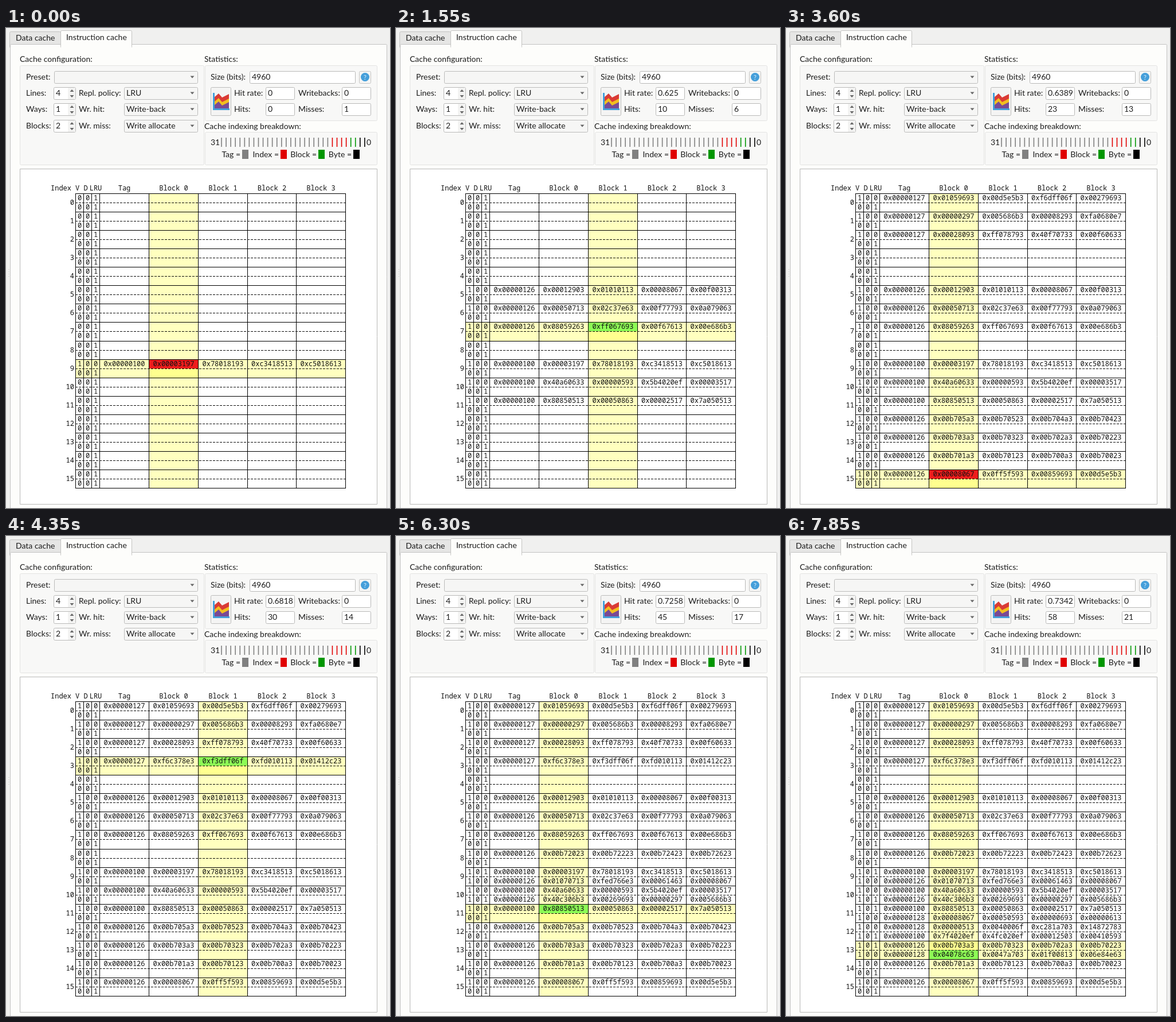
These frames come from a looping animation (670 by 836 pixels, 7.95 s). An HTML page with a canvas:

```html
<!DOCTYPE html>
<html lang="en">
<head>
<meta charset="utf-8">
<title>Instruction cache</title>
<style>
  html, body { margin: 0; width: 100%; height: 100%; overflow: hidden; background: #f0f0ef; }
  canvas { display: block; width: 670px; height: 836px; }
</style>
</head>
<body>
<canvas id="stage" width="670" height="836"></canvas>
<script>
const ctx = document.getElementById('stage').getContext('2d');
const UI = '14px Lato, sans-serif';
const MONO = '12px "Noto Sans Mono", monospace';
const LOOP = 7950;
const PACE = 100.6; // mean ms per fetch

const range = (n, fn) => Array.from({ length: n }, (_, i) => fn(i));
const hex = n => '0x' + n.toString(16).padStart(8, '0');

// Program memory by address
const memory = new Map();
function load(addr, words) {
  words.forEach((word, i) => memory.set(addr + 4 * i, word));
}
const code = str => str.trim().split(/\s+/).map(w => '0x' + w);
const storeByte = n => hex(0x00b70023 | n << 7);
const storeWord = n => hex(0x00b72023 | n << 7);

load(0x10090, code(`
  00003197 78018193 c3418513 c5018613 40a60633 00000593 5b4020ef 00003517
  80850513 00050863 00002517 7a050513 7f4020ef 4fc020ef 00012503 00410593`));
load(0x12650, code(`
  00012903 01010113 00008067 00f00313 00050713 02c37e63 00f77793 0a079063
  08059263 ff067693 00f67613 00e686b3`));
load(0x12680, range(4, i => storeWord(4 * i)));
load(0x12690, code(`
  01070713 fed766e3 00061463 00008067 40c306b3 00269693 00000297 005686b3`));
load(0x126c0, range(12, i => storeByte(11 - i)));
load(0x126f0, code(`
  00008067 0ff5f593 00859693 00d5e5b3 01059693 00d5e5b3 f6dff06f 00279693
  00000297 005686b3 00008293 fa0680e7 00028093 ff078793 40f70733 00f60633
  f6c378e3 f3dff06f fd010113 01412c23`));
load(0x128b0, code(`
  00008067 00050593 00000693 00000613 00000513 0040006f c281a703 14872783
  04078c63 0047a703 01f00813 06e84e63`));

// Straight runs of fetches between jumps; the last one refetches after a stall
const trace = [
  [0x10090, 0x100b0], [0x1265c, 0x12674], [0x1270c, 0x12724], [0x126c0, 0x126f8],
  [0x12720, 0x1273c], [0x12670, 0x126a4], [0x100ac, 0x100c8], [0x128b4, 0x128cc],
  [0x128c8, 0x128d0], [0x128d0, 0x128d0]
].flatMap(([from, to]) => range((to - from) / 4 + 1, i => from + 4 * i));

// Spans of activity: each one catches up with the mean pace, evenly on a 50 ms grid
const spans = [
  [250, 450], [650, 850], [1100, 1300], [1450, 1550], [1700, 2450], [2600, 2650],
  [2800, 2800], [2950, 3450], [3600, 3650], [3800, 4050], [4200, 4350], [4500, 4600],
  [4750, 5250], [5400, 5500], [5700, 5900], [6050, 6600], [6750, 7250], [7400, 7850]
];
const times = [0];
for (const [from, to] of spans) {
  const n = Math.floor(to / PACE) + 1 - times.length;
  const step = n > 1 ? (to - from) / (n - 1) : 0;
  times.push(...range(n, i => 50 * Math.round((from + step * i) / 50)));
}

// Two-way LRU cache after the first n fetches
function simulate(n) {
  const sets = range(16, () => range(2, () => ({ valid: 0, lru: 1, tag: -1, words: [] })));
  const s = { sets, hits: 0, misses: 0 };
  for (const addr of trace.slice(0, n)) {
    const tag = addr >> 8;
    const base = addr & ~15;
    s.index = addr >> 4 & 15;
    s.block = addr >> 2 & 3;
    const ways = sets[s.index];
    s.way = ways.findIndex(w => w.tag === tag);
    s.hit = s.way >= 0;
    if (s.hit) {
      s.hits++;
    } else {
      s.misses++;
      s.way = ways.findIndex(w => w.lru);
      const words = range(4, i => memory.get(base + 4 * i));
      Object.assign(ways[s.way], { valid: 1, tag, words });
    }
    ways.forEach((w, i) => { w.lru = i === s.way ? 0 : 1; });
  }
  return s;
}

function text(str, x, y, font = UI, align = 'left', color = '#1c1c1c') {
  ctx.font = font;
  ctx.textAlign = align;
  ctx.fillStyle = color;
  ctx.fillText(str, x, y);
}

function rect(x, y, w, h, fill) {
  ctx.fillStyle = fill;
  ctx.fillRect(x, y, w, h);
}

function box(x1, y1, x2, y2, fill, stroke, r = 0) {
  ctx.beginPath();
  ctx.roundRect(x1 + .5, y1 + .5, x2 - x1, y2 - y1, r);
  ctx.fillStyle = fill;
  ctx.fill();
  ctx.strokeStyle = stroke;
  ctx.lineWidth = 1;
  ctx.stroke();
}

function line(x1, y1, x2, y2, dash = []) {
  ctx.setLineDash(dash);
  ctx.beginPath();
  ctx.moveTo(x1, y1);
  ctx.lineTo(x2, y2);
  ctx.stroke();
  ctx.setLineDash([]);
}

function poly(color, ...pts) {
  ctx.beginPath();
  for (let i = 0; i < pts.length; i += 2) ctx.lineTo(pts[i], pts[i + 1]);
  ctx.fillStyle = color;
  ctx.fill();
}

function arrow(x, y, d) {
  poly('#666', x - 3.5, y - d * 2, x + 3.5, y - d * 2, x, y + d * 2);
}

function group(x1, y1, x2, y2) {
  box(x1, y1, x2, y2, '#f8f8f7', '#e3e3e2', 2);
}

function field(x1, y1, x2, value) {
  box(x1, y1, x2, y1 + 21, '#fff', '#b9b9b8', 2);
  text(value, x1 + 4, y1 + 15);
}

function combo(x, y, value) {
  box(x, y, 334, y + 21, '#f6f6f5', '#bcbcbb', 2);
  text(value, x + 4, y + 15);
  arrow(325, y + 10.5, 1);
}

function spin(y, value) {
  field(83, y, 121, value);
  rect(108, y + 1, 13, 20, '#f3f3f2');
  arrow(115, y + 6, -1);
  arrow(115, y + 16, 1);
}

function drawConfig() {
  text('Cache configuration:', 24, 59);
  group(24, 65, 345, 238);
  text('Preset:', 35, 90);
  combo(84, 75, '');
  [['Lines:', 4, 'Repl. policy:', 'LRU'],
   ['Ways:', 1, 'Wr. hit:', 'Write-back'],
   ['Blocks:', 2, 'Wr. miss:', 'Write allocate']].forEach(([a, n, b, v], i) => {
    const y = 103 + Math.round(28.3 * i);
    text(a, 35, y + 15);
    spin(y, n);
    text(b, 127, y + 15);
    combo(206, y, v);
  });
}

function drawChartIcon() {
  box(357, 103, 392, 152, '#f4f4f3', '#bcbcbb', 2);
  const band = (color, y) => poly(color, 364, y + 6, 371, y, 377, y + 7, 389, y + 1, 389, 140, 364, 140);
  band('#da3b35', 114);
  band('#f3bf20', 122);
  band('#7a4a94', 128);
  rect(361, 113, 3, 30, '#459fda');
  rect(361, 140, 29, 3, '#459fda');
}

function drawStats(s) {
  text('Statistics:', 346, 59);
  group(347, 65, 647, 161);
  text('Size (bits):', 357, 90);
  field(425, 75, 609, '4960');

  box(616, 75, 636, 96, '#f6f6f5', '#c4c4c3', 2);
  ctx.beginPath();
  ctx.arc(626.5, 85.5, 7.5, 0, 7);
  ctx.fillStyle = '#459fda';
  ctx.fill();
  text('?', 626.5, 89.5, '11px Lato, sans-serif', 'center', '#dff1ff');
  drawChartIcon();

  const rate = +(s.hits / (s.hits + s.misses)).toPrecision(4);
  text('Hit rate:', 398, 118);
  field(453, 103, 503, rate);
  text('Hits:', 398, 146);
  field(453, 131, 503, s.hits);
  text('Writebacks:', 510, 118);
  field(586, 103, 636, 0);
  text('Misses:', 510, 146);
  field(586, 131, 636, s.misses);
}

function drawBreakdown() {
  text('Cache indexing breakdown:', 346, 176);
  group(347, 181, 647, 238);
  text('31', 357, 204);
  text('0', 629, 204);
  let bit = 0;
  [['Tag =', '#808080', 24, 412], ['Index =', '#e00000', 4, 479],
   ['Block =', '#009600', 2, 545], ['Byte =', '#000', 2, 606]]
    .forEach(([label, color, bits, x]) => {
      for (let i = 0; i < bits; i++) rect(375.2 + 8.06 * bit++, 191, 1.6, 16, color);
      text(label, x - 3, 225, UI, 'right');
      rect(x, 212, 11, 16, color);
    });
}

function drawWindow() {
  rect(0, 0, 670, 836, '#f0f0ef');
  box(6, 6, 95, 34, '#e6e6e5', '#c3c3c2', 2);
  box(7, 28, 664, 850, '#fdfdfb', '#c3c3c2', 1);
  box(95, 4, 219, 34, '#fdfdfb', '#c3c3c2', 2);
  rect(96, 28, 123, 8, '#fdfdfb');
  text('Data cache', 17, 22);
  text('Instruction cache', 105, 21);
  for (let y = 420; y < 436; y += 4) rect(4, y, 2, 1, '#d8d8d7');
}

// Table edges: three narrow columns, then five wide ones
const colX = i => Math.round(i < 3 ? 121 + 14.2 * i : 163.4 + 85.7 * (i - 3));
const rowY = i => Math.round(288 + 32.07 * i);
const midX = i => (colX(i) + colX(i + 1)) / 2 + .5;

function drawTable(s) {
  box(24, 245, 647, 829, '#fff', '#b9b9b8');

  const shade = 'rgba(255,255,0,.25)';
  const x = colX(4 + s.block), w = colX(5 + s.block) - x;
  const y = rowY(s.index), h = rowY(s.index + 1) - y;
  rect(x, 288, w, 513, shade);
  rect(121, y, 471, h, shade);
  rect(x, y + 16 * s.way, w, 16, s.hit ? '#8dfc55' : '#ee1c1c');

  ctx.strokeStyle = '#000';
  ctx.lineWidth = 1;
  for (let i = 0; i < 9; i++) line(colX(i) + .5, 288, colX(i) + .5, 802);
  for (let i = 0; i <= 16; i++) line(121, rowY(i) + .5, 593, rowY(i) + .5);
  for (let i = 0; i < 16; i++) line(121, rowY(i) + 16.5, 592, rowY(i) + 16.5, [4, 2]);

  const mono = (str, cx, base, align = 'center') => text(str, cx, base, MONO, align, '#111');
  mono('Index', 78, 283, 'left');
  mono('V', 124.5, 283);
  mono('D', 139, 283);
  mono('LRU', 156.5, 283);
  ['Tag', 'Block 0', 'Block 1', 'Block 2', 'Block 3'].forEach((name, i) => mono(name, midX(3 + i), 283));

  s.sets.forEach((ways, i) => {
    mono(i, 119, rowY(i) + 20, 'right');
    ways.forEach((way, k) => {
      const base = rowY(i) + 12 + 16 * k;
      [way.valid, 0, way.lru].forEach((bit, j) => mono(bit, midX(j), base));
      if (way.valid) [hex(way.tag), ...way.words].forEach((word, j) => mono(word, midX(3 + j), base));
    });
  });
}

function draw(n) {
  const s = simulate(n);
  drawWindow();
  drawConfig();
  drawStats(s);
  drawBreakdown();
  drawTable(s);
}

let shown = 0;
function tick() {
  const t = performance.now() % LOOP;
  const n = times.filter(at => at <= t).length;
  if (n !== shown) draw(shown = n);
  requestAnimationFrame(tick);
}
tick();
</script>
</body>
</html>
```
